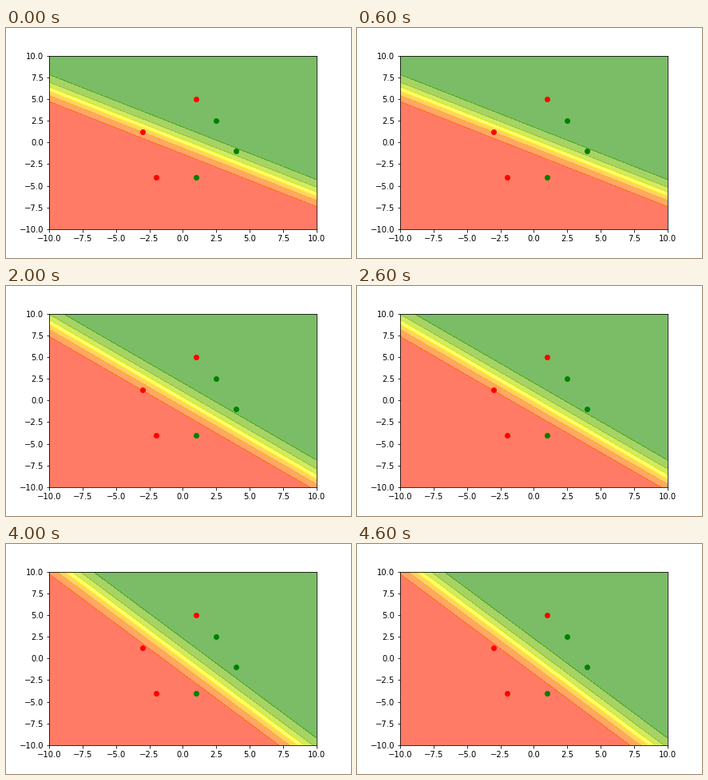
Animation, 432 px wide and 288 px high, one loop 5000 ms. Source, as a matplotlib script:

```python
import numpy as np
import matplotlib.pyplot as plt
from matplotlib.animation import FuncAnimation
from matplotlib.colors import LinearSegmentedColormap

STEPS = 5
STEEPNESS = 1.475
BIAS = -0.04
LEVELS = np.arange(8) * 0.15
RED_POINTS = [(1, 5), (-3, 1.25), (-2, -4)]
GREEN_POINTS = [(2.5, 2.5), (4, -1), (1, -4)]

cmap = LinearSegmentedColormap.from_list("decision", ["red", "yellow", "green"])
axis = np.linspace(-10, 10, 201)
X, Y = np.meshgrid(axis, axis)

fig = plt.figure(figsize=(6, 4), dpi=72, facecolor="white")
fig.subplots_adjust(left=0.125, right=0.9, bottom=0.125, top=0.88)
ax = fig.add_subplot()


def boundary_angle(step):
    """Steady turn with a quick start that dies away."""
    return 0.602 + 0.063 * step - 0.058 * np.exp(-2.3 * step)


def probability(step):
    angle = boundary_angle(step)
    score = STEEPNESS * (np.sin(angle) * X + np.cos(angle) * Y) + BIAS
    return 1 / (1 + np.exp(-score))


def draw(step):
    ax.clear()
    ax.contourf(X, Y, probability(step), levels=LEVELS, cmap=cmap, alpha=0.6)
    for points, color in ((RED_POINTS, "red"), (GREEN_POINTS, "green")):
        ax.plot(*zip(*points), "o", color=color)
    ax.set(xlim=(-10, 10), ylim=(-10, 10))


anim = FuncAnimation(fig, draw, frames=STEPS, init_func=lambda: None,
                     interval=1000, repeat=True, repeat_delay=0)
plt.show()
```
